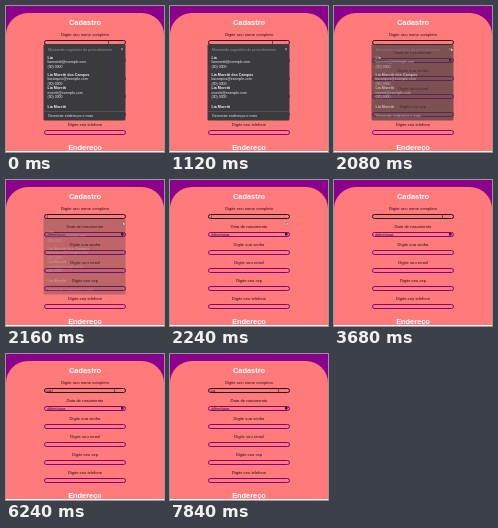
Write an HTML page with a canvas that moves like this. It is 158x146 px and loops after 8000 ms.

```html
<!DOCTYPE html>
<html lang="pt-BR">
<head>
<meta charset="utf-8">
<style>
html, body { margin: 0; width: 100%; height: 100%; overflow: hidden; background: #8b008b; }
canvas { display: block; }
</style>
</head>
<body>
<canvas id="stage" width="158" height="146"></canvas>
<script>
const ctx = document.getElementById('stage').getContext('2d');
const LOOP = 8000;
const SANS = '"Liberation Sans", Arial, sans-serif';
const PURPLE = '#85007f';
const labels = [
  'Digite seu nome completo', 'Data de nascimento', 'Digite sua senha',
  'Digite seu email', 'Digite seu cep', 'Digite seu telefone'
];
// [text, baseline, bold]
const suggestions = [
  ['Lia', 52.5, true],
  ['liamoretti@exemplo.com', 57.3],
  ['(00) 0000', 61.6],
  ['Lia Moretti dos Campos', 69.6, true],
  ['liacampos@exemplo.com', 74.3],
  ['(00) 0000', 78.6],
  ['Lia Moretti', 83.4, true],
  ['moretti@exemplo.com', 88],
  ['(00) 0000', 92.4],
  ['Lia Moretti', 101.5, true]
];

const clamp = v => Math.max(0, Math.min(1, v));
const ease = v => v * v * (3 - 2 * v);
const progress = (t, from, to) => ease(clamp((t - from) / (to - from)));

function text(str, x, y, size, color, bold, align = 'left') {
  ctx.font = `${bold ? 'bold ' : ''}${size}px ${SANS}`;
  ctx.fillStyle = color;
  ctx.textAlign = align;
  ctx.fillText(str, x, y);
}

function box(x, y, w, h, r, fill, stroke) {
  ctx.beginPath();
  ctx.roundRect(x, y, w, h, r);
  if (fill) { ctx.fillStyle = fill; ctx.fill(); }
  if (stroke) { ctx.strokeStyle = stroke; ctx.lineWidth = 1; ctx.stroke(); }
}

function page() {
  ctx.fillStyle = '#8b008b';
  ctx.fillRect(0, 0, 158, 146);
  box(0, 7, 158, 138, [22, 22, 0, 0], '#ff7b7b');
  ctx.fillStyle = '#fff';
  ctx.fillRect(0, 145, 158, 1);
  text('Cadastro', 79, 18.7, 7.4, '#fff', true, 'center');
  text('Endereço', 79, 144.3, 7.4, '#fff', true, 'center');
  labels.forEach((label, i) => {
    const y = 34.5 + i * 18;
    text(label, 79, y - 5, 4.15, '#240a18', false, 'center');
    box(38.5, y, 81, 4, 2, null, i ? PURPLE : '#2b0a20');
  });
  text('dd/mm/aaaa', 41, 56, 3.3, '#301020');
  ctx.fillStyle = '#301020';
  ctx.fillRect(115, 53, 2.5, 2.5);
}

function popup(alpha) {
  if (!alpha) return;
  ctx.save();
  ctx.globalAlpha = alpha;
  box(37.5, 38, 82, 76.5, 1.5, '#3b3b3f');
  text('Mostrando sugestões de preenchimento', 42, 44.6, 3.6, '#99999d');
  for (const [str, y, bold] of suggestions) {
    text(str, 41.5, y, bold ? 3.7 : 3.5, '#f1f1f1', bold);
  }
  ctx.fillStyle = '#68686c';
  ctx.fillRect(38, 105, 81, .5);
  text('Gerenciar endereços e mais', 42, 110.8, 3.6, '#e8e8e8');
  text('×', 116, 44.5, 4.5, '#ddd', false, 'center');
  ctx.restore();
}

function typing(t) {
  const count = t < 5200 ? 0 : Math.min(3, 1 + Math.floor((t - 5200) / 320));
  const str = 'Lia'.slice(0, count);
  text(str, 40.5, 37.8, 3.7, '#160812');
  if (t > 2160 && t % 1000 < 500) {
    ctx.fillRect(41 + ctx.measureText(str).width, 35, .4, 3);
  }
}

function pointer(t) {
  const out = progress(t, 1120, 1840);
  const back = progress(t, 2320, 3520);
  const x = 102 + 15 * out - 9 * back;
  const y = 36 + 6 * out - 6 * back;
  if (out < .3 || back > .8) {
    ctx.fillStyle = '#241018';
    ctx.fillRect(x, y - 1.7, .6, 3.6);
    return;
  }
  ctx.beginPath();
  ctx.moveTo(x, y);
  ctx.lineTo(x, y + 3.6);
  ctx.lineTo(x + 1, y + 2.7);
  ctx.lineTo(x + 2.5, y + 2.6);
  ctx.closePath();
  ctx.fillStyle = '#fff';
  ctx.fill();
  ctx.strokeStyle = '#222';
  ctx.lineWidth = .3;
  ctx.stroke();
}

function draw(now) {
  const t = now % LOOP;
  page();
  typing(t);
  popup(1 - clamp((t - 2000) / 240));
  pointer(t);
  requestAnimationFrame(draw);
}
requestAnimationFrame(draw);
</script>
</body>
</html>
```
